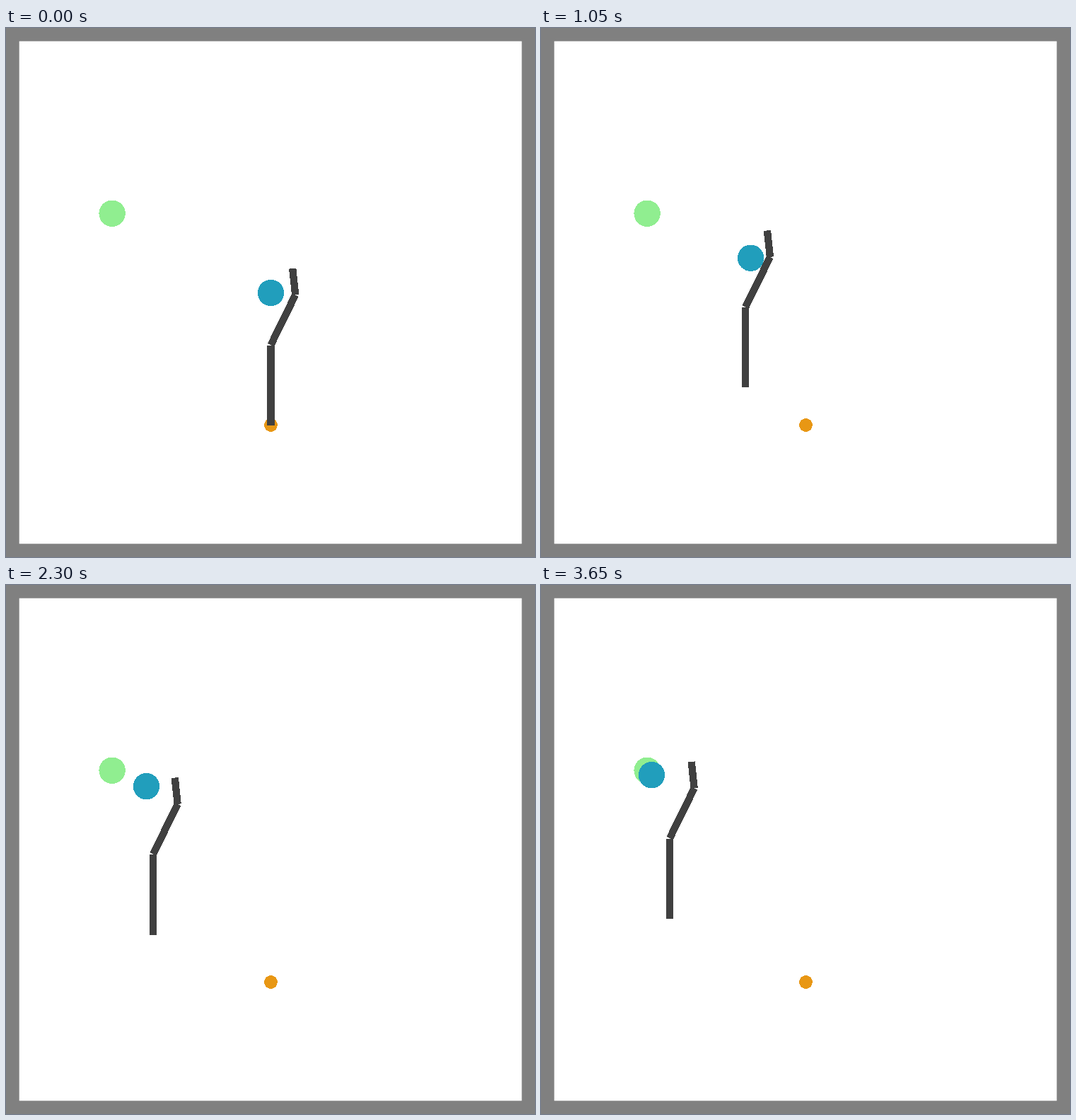
Write an HTML page that moves like this. It is 748 px wide and 748 px high and loops after 3.7 s.

```html
<!DOCTYPE html>
<html lang="en">
<head>
<meta charset="utf-8">
<title>Push to goal</title>
<style>
  html, body { margin: 0; width: 100%; height: 100%; overflow: hidden; background: #808080; }
  svg { display: block; width: 748px; height: 748px; }
</style>
</head>
<body>
<svg viewBox="0 0 748 748">
  <rect width="748" height="748" fill="#808080"/>
  <rect x="18.7" y="18.7" width="710.6" height="710.6" fill="#fff"/>
  <g shape-rendering="crispEdges">
    <circle cx="150.1" cy="262.2" r="18.7" fill="#90ee90"/>
    <circle cx="374.5" cy="561.5" r="9.4" fill="#e89714"/>
    <circle id="ball" r="18.7" fill="#219ebc"/>
    <g id="stick" stroke="#404040" stroke-width="10.3">
      <path d="M0 0v-113.5"/>
      <path d="M0 -113.8l34.7 -70.8"/>
      <path d="M34.7 -184.6l-4 -37.4"/>
    </g>
  </g>
</svg>
<script>
const STEP = 50, STEPS = 74;

// Key poses: step, x, y
const stickKeys = [
  [0, 374.5, 562], [13, 325, 522.5], [33, 239, 498],
  [46, 208, 494.5], [61, 190, 486], [73, 182, 472]
];
const ballKeys = [
  [2, 374.5, 374.5], [13, 331.5, 344.5], [33, 244.5, 301.5],
  [46, 198.5, 284.7], [73, 156.5, 268.7]
];

const speed = (a, b, axis) => (b[axis] - a[axis]) / (b[0] - a[0]);

// Starts from rest; elsewhere the slope of the parabola through the neighbours
function slope(keys, i, axis) {
  if (i === 0) return 0;
  const [a, b, c] = [keys[i - 1], keys[i], keys[i + 1]];
  if (!c) return 2 * speed(a, b, axis) - slope(keys, i - 1, axis);
  return speed(a, b, axis) + speed(b, c, axis) - speed(a, c, axis);
}

// Cubic Hermite curve through the key poses
function along(keys, step, axis) {
  const s = Math.max(step, keys[0][0]);
  const i = keys.findIndex(k => s <= k[0]) || 1;
  const a = keys[i - 1], b = keys[i], span = b[0] - a[0];
  const u = (s - a[0]) / span, v = 1 - u, mean = speed(a, b, axis);
  const bend = v * (slope(keys, i - 1, axis) - mean) - u * (slope(keys, i, axis) - mean);
  return a[axis] + span * u * (mean + v * bend);
}

function place(el, keys, step) {
  el.setAttribute("transform", `translate(${along(keys, step, 1)} ${along(keys, step, 2)})`);
}

const ball = document.getElementById("ball");
const stick = document.getElementById("stick");
const start = performance.now();

function draw() {
  const step = Math.floor((performance.now() - start) / STEP) % STEPS;
  place(ball, ballKeys, step);
  place(stick, stickKeys, step);
  requestAnimationFrame(draw);
}
draw();
</script>
</body>
</html>
```
